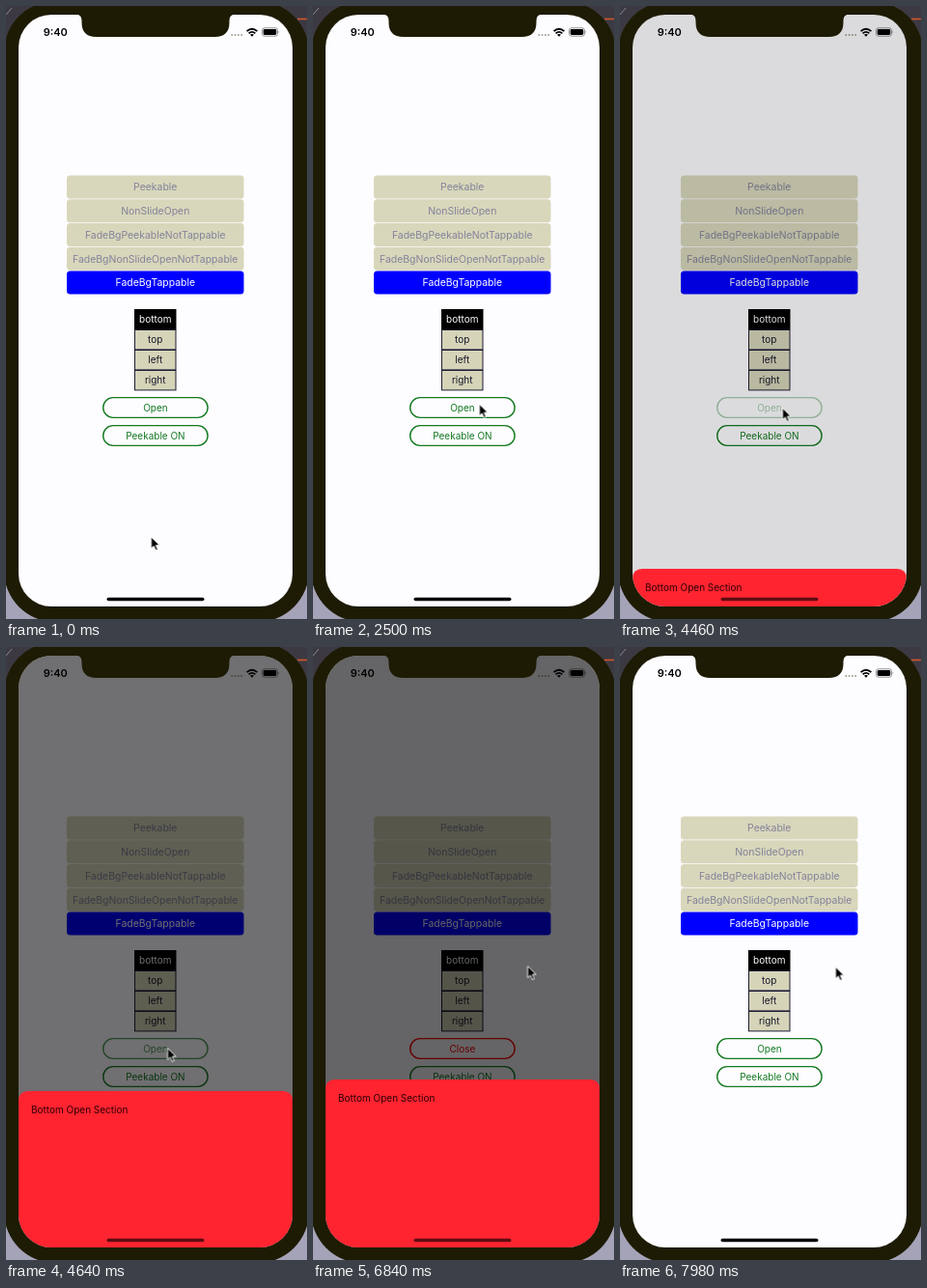
These frames come from a looping animation (312 by 635 pixels, 8000 ms). An HTML page:

```html
<!DOCTYPE html>
<html lang="en">
<head>
<meta charset="utf-8">
<title>Bottom sheet demo</title>
<style>
  html, body { margin: 0; width: 100%; height: 100%; overflow: hidden; background: #3c3942; }
  svg { display: block; width: 312px; height: 635px; }
  text { font: 10px Inter, "Liberation Sans", sans-serif; text-anchor: middle; }
  .option { fill: #d8d7bb; }
  .option + text { fill: #85829b; font-size: 10.45px; }
  .option.on { fill: #00f; }
  .option.on + text { fill: #fff; }
  .cell { fill: #d5d4b8; stroke: #1c1b35; }
  .cell + text { fill: #17162a; }
  .cell.on { fill: #000; stroke: #000; }
  .cell.on + text { fill: #fff; }
  .pill { fill: none; stroke: currentColor; stroke-width: 1.4; }
  .pill + text { fill: currentColor; }
  .green { color: #147a22; }
  .red { color: #f00; }
</style>
</head>
<body>
<svg viewBox="0 0 312 635">
  <defs>
    <clipPath id="screen"><rect x="13" y="9" width="284" height="613" rx="34"/></clipPath>
  </defs>

  <rect y="560" width="312" height="75" fill="#a5a3b8"/>
  <path d="M0 9 6 2" stroke="#8a8790"/>
  <path d="M302 13.5h10" stroke="#d4552c" stroke-width="1.6"/>
  <rect x="-2" y="-5" width="316" height="643" rx="53" fill="#1d1b03"/>

  <g clip-path="url(#screen)">
    <rect x="13" y="9" width="284" height="613" fill="#fdfcff"/>
    <g id="status">
      <text x="51.2" y="31" style="font-size:11px;font-weight:600">9:40</text>
      <path d="M233.5 30h12" stroke="#8c8a78" stroke-width="1.6" stroke-dasharray="1.6 1.7"/>
      <g fill="none" stroke="#000" stroke-width="1.8">
        <path d="M249.6 26.2q5.4-5 10.8 0M251.6 28.4q3.4-3 6.8 0"/>
      </g>
      <path d="M253 29.8q2-1.6 4 0l-2 2z"/>
      <rect x="265.5" y="22.8" width="16" height="8.4" rx="2.4" fill="none" stroke="#777" stroke-width=".8"/>
      <rect x="266.7" y="24" width="13.6" height="6" rx="1.4"/>
      <path d="M282.6 25.6q1.6 1.4 0 2.8z" fill="#777"/>
    </g>
    <g id="options"></g>
    <g id="cells"></g>
    <g id="toggle">
      <g id="open" class="green"></g>
      <g id="close" class="red"></g>
    </g>
    <g id="peek" class="green"></g>

    <rect id="fade" x="13" y="9" width="284" height="613" opacity="0"/>
    <g id="panel">
      <path d="M13 634V458q0-10 10-10h264q10 0 10 10v176z" fill="#ff2430"/>
      <text x="26" y="471" fill="#2a0006" style="text-anchor:start">Bottom Open Section</text>
    </g>
    <rect id="home" x="104.5" y="612.7" width="101" height="3.6" rx="1.8"/>
  </g>

  <path d="M72 8.5q6.5 0 6.5 6.5v2q0 15 15 15h123q15 0 15-15v-2q0-6.500 6.500-6.500z" fill="#1d1b03"/>
  <path id="cursor" d="M0 0v12l2.800-2.500 2 4.500 2-.9-1.900-4.400h3.800z"
        stroke="#fff" stroke-width=".9" stroke-linejoin="round"/>
</svg>
<script>
  const LOOP = 8000;
  const $ = id => document.getElementById(id);

  function button(parent, kind, label, x, y, w, h, rx) {
    $(parent).insertAdjacentHTML('beforeend',
      `<rect class="${kind}" x="${x}" y="${y}" width="${w}" height="${h}" rx="${rx}"/>
       <text x="${x + w / 2}" y="${y + h / 2 + 3.7}">${label}</text>`);
  }

  ['Peekable', 'NonSlideOpen', 'FadeBgPeekableNotTappable',
    'FadeBgNonSlideOpenNotTappable', 'FadeBgTappable'].forEach((label, i) =>
    button('options', i === 4 ? 'option on' : 'option', label, 63, 175.6 + i * 24.75, 183.5, 24, 3.5));

  ['bottom', 'top', 'left', 'right'].forEach((label, i) =>
    button('cells', i ? 'cell' : 'cell on', label, 133.5, 314.5 + i * 21, 42.5, 20.4, 0));

  const pill = (id, label, y) => button(id, 'pill', label, 100.7, y, 108.4, 20.8, 10.4);
  pill('open', 'Open', 405.6);
  pill('close', 'Close', 405.6);
  pill('peek', 'Peekable ON', 434.6);

  // Steps are [time in ms, value, easing towards the next step].
  function track(id, prop, steps) {
    const last = steps[steps.length - 1];
    const frames = [...steps, [LOOP, last[1]]].map(([t, value, easing = 'linear']) =>
      ({ offset: t / LOOP, [prop]: value, easing }));
    $(id).animate(frames, { duration: LOOP, iterations: Infinity });
  }

  const slide = 'cubic-bezier(.455,.03,.515,.955)';
  const ease = 'ease-in-out';
  const hold = 'step-end';
  const at = (x, y) => `translate(${x}px, ${y}px)`;

  // The sheet and its backdrop share one open/close motion.
  const sheet = (shut, open) =>
    [[0, shut], [4340, shut, slide], [4710, open], [7530, open, slide], [7900, shut]];

  track('panel', 'transform', sheet(at(0, 174), at(0, 0)));
  track('fade', 'opacity', sheet(0, .6));
  track('home', 'opacity', [[0, 1], [4340, 1], [4440, .62], [7530, .62], [7750, .9], [7900, 1]]);

  track('toggle', 'opacity', [[0, 1], [4260, 1], [4380, .38], [4500, .38], [4740, 1]]);
  track('open', 'opacity', [[0, 1, hold], [4760, 0, hold], [7900, 1]]);
  track('close', 'opacity', [[0, 0, hold], [4760, 1, hold], [7900, 0]]);

  track('cursor', 'transform', [
    [0, at(150.5, 550)], [500, at(150.5, 550), ease],
    [1900, at(172.5, 412.5)], [3300, at(172.5, 412.5), ease],
    [4000, at(168.5, 416.5)], [4460, at(168.5, 416.5)],
    [4640, at(167.5, 415.5)], [5000, at(167.5, 415.5), ease],
    [5800, at(222.5, 330.5)], [6840, at(222.5, 330.5)],
    [7400, at(223.5, 331.5)]
  ]);
</script>
</body>
</html>
```
